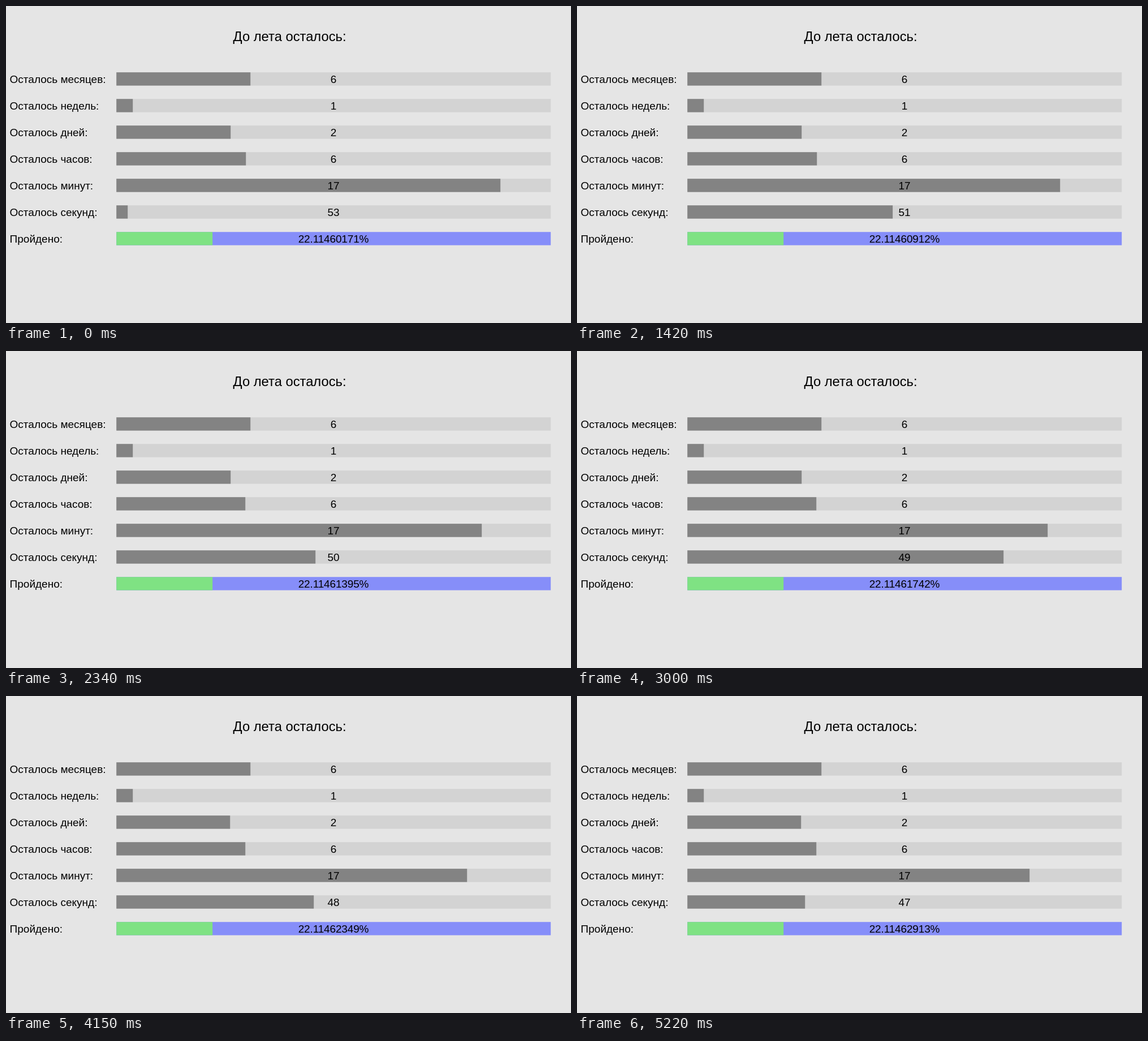
Write an HTML page that moves like this. It is 999 by 560 pixels and loops after 5250 ms.

```html
<!DOCTYPE html>
<html lang="ru">
<head>
<meta charset="utf-8">
<title>До лета осталось</title>
<style>
  html, body { margin: 0; width: 100%; height: 100%; overflow: hidden; background: #e5e5e5; }
  svg { display: block; width: 999px; height: 560px; font-family: "Liberation Sans", Arial, sans-serif; }
  .title { font-size: 23.75px; }
  .label { font-size: 19px; }
  .value { font-size: 19px; letter-spacing: -0.15px; text-anchor: middle; }
  .track { fill: #d3d3d3; }
  .fill { fill: #838383; }
  .total .track { fill: #868ef9; }
  .total .fill { fill: #7fe283; }
</style>
</head>
<body>
<svg id="stage" viewBox="0 0 999 560">
  <text class="title" x="401.6" y="62">До лета осталось:</text>
</svg>
<script>
const LOOP = 5250, TICK = 30.2;
const LEFT = 195.2, WIDTH = 768, TOP = 117, PITCH = 47, HEIGHT = 23.4;
const DAY = 86400, SPAN = 243 * DAY;
const START_LEFT = 9 * DAY + 6 * 3600 + 17 * 60 + 53.0265;
const START_PERCENT = 22.114601714;

// Loop time in ms against seconds counted down.
const pace = [
  [0, 0], [670, 0.7426], [1420, 1.554], [2340, 2.5682],
  [3690, 4.0617], [4580, 5.0473], [5220, 5.7557], [LOOP, 5.789]
];

const stage = document.getElementById('stage');

function add(parent, tag, attrs, text = '') {
  const el = document.createElementNS('http://www.w3.org/2000/svg', tag);
  for (const key in attrs) el.setAttribute(key, attrs[key]);
  el.textContent = text;
  parent.append(el);
  return el;
}

function addRow(name, index) {
  const y = TOP + index * PITCH;
  const row = add(stage, 'g', { class: name === 'Пройдено' ? 'total' : 'part' });
  const bar = { x: LEFT, y: y + 0.2, height: HEIGHT };
  add(row, 'text', { class: 'label', x: 6.6, y: y + 19 }, name + ':');
  add(row, 'rect', { class: 'track', width: WIDTH, ...bar });
  const fill = add(row, 'rect', { class: 'fill', width: 0, ...bar });
  const value = add(row, 'text', { class: 'value', x: 579, y: y + 19 });
  return (text, share) => {
    value.textContent = text;
    fill.setAttribute('width', Math.round(share * WIDTH));
  };
}

const units = ['месяцев', 'недель', 'дней', 'часов', 'минут', 'секунд'];
const names = [...units.map(unit => 'Осталось ' + unit), 'Пройдено'];
const [months, weeks, days, hours, minutes, seconds, passed] = names.map(addRow);

// Moves in even ticks from one key point to the next.
function elapsedAt(time) {
  const next = pace.findIndex(([t]) => t > time);
  const [t0, s0] = pace[next - 1];
  const [t1, s1] = pace[next];
  const steps = Math.round((t1 - t0) / TICK);
  const step = Math.floor((time - t0) / (t1 - t0) * steps + 1e-6);
  return s0 + (s1 - s0) * step / steps;
}

function draw(time) {
  const elapsed = elapsedAt(time);
  const left = START_LEFT - elapsed;
  const percent = START_PERCENT + elapsed * 100 / SPAN;
  const show = (row, unit, count) => {
    const amount = left / unit % count;
    row(Math.floor(amount), amount / count);
  };
  months(6, left / DAY / 30);
  weeks(Math.floor(left / DAY / 7), 29 / WIDTH);
  days(Math.floor(left / DAY % 7), left / DAY % 1);
  hours(Math.floor(left / 3600 % 24), left / 3600 % 1);
  minutes(Math.floor(left / 60 % 60), left / 60 % 1);
  seconds(Math.floor(left % 60), left % 1);
  passed(percent.toFixed(8) + '%', percent / 100);
}

function frame() {
  draw(performance.now() % LOOP);
  requestAnimationFrame(frame);
}
frame();
</script>
</body>
</html>
```
